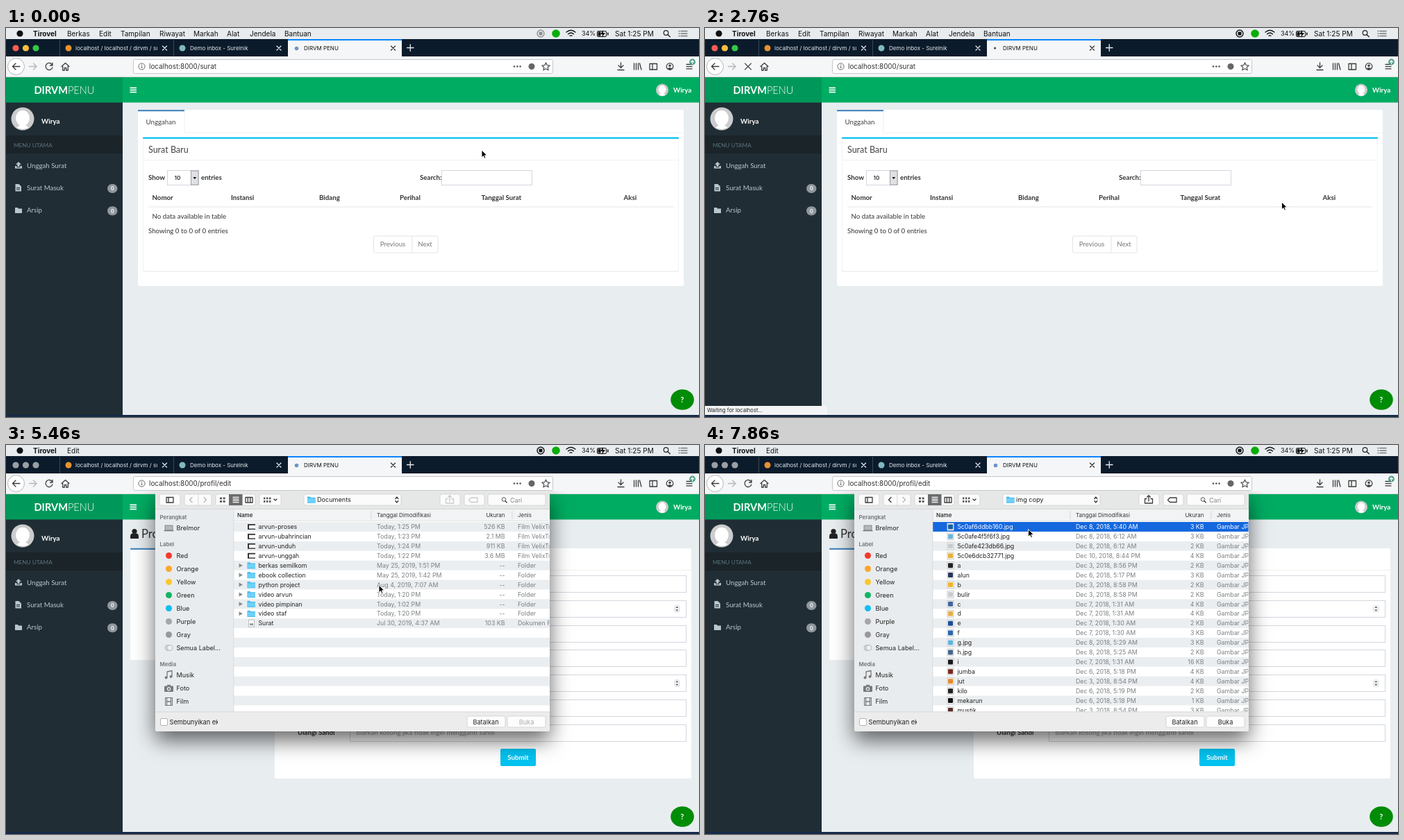
Recreate the animation shown at these times as an HTML page. Size 998 px wide and 561 px high, loop 8000 ms.

```html
<!DOCTYPE html>
<html lang="id">
<head>
<meta charset="utf-8">
<title>Unggahan</title>
<style>
html, body { margin: 0; width: 100%; height: 100%; overflow: hidden; background: #e9edf0; }
svg { display: block; width: 998px; height: 561px; }
text { white-space: pre; }
.mac { font-family: Inter, Roboto, sans-serif; }
.web { font-family: Lato, "Open Sans", sans-serif; }
.b { font-weight: 700; }
.m { font-weight: 600; }
.l { font-weight: 300; }
.line { fill: none; stroke: #3c3c3c; stroke-width: 1.3; stroke-linecap: round; stroke-linejoin: round; }
</style>
</head>
<body>
<svg id="stage" viewBox="0 0 998 561" xmlns="http://www.w3.org/2000/svg"></svg>
<script>
const LOOP = 8000;

// Drawing helpers
const R = (x, y, w, h, fill, more = '') => `<rect x="${x}" y="${y}" width="${w}" height="${h}" fill="${fill}" ${more}/>`;
const C = (x, y, r, fill, more = '') => `<circle cx="${x}" cy="${y}" r="${r}" fill="${fill}" ${more}/>`;
const P = (d, more = '') => `<path d="${d}" class="line" ${more}/>`;
const F = (d, fill, more = '') => `<path d="${d}" fill="${fill}" ${more}/>`;
const G = (id, body, more = '') => `<g id="${id}" ${more}>${body}</g>`;
const esc = s => s.replace(/&/g, '&amp;').replace(/</g, '&lt;');
// y is the middle of the capitals
const T = (x, y, s, size, fill = '#222', more = '') =>
  `<text x="${x}" y="${(y + size * .36).toFixed(2)}" font-size="${size}" fill="${fill}" ${more}>${esc(s)}</text>`;
const MID = 'text-anchor="middle" ', END = 'text-anchor="end" ', BOLD = 'class="b" ';
const ink = c => `style="stroke:${c}"`;
const box = (x, y, w, h, stroke = '#d2d6de', r = 0, fill = '#fff') =>
  R(x + .5, y + .5, w - 1, h - 1, fill, `stroke="${stroke}" rx="${r}"`);
const cross = (x, y, r, c) => P(`M${x - r} ${y - r}l${2 * r} ${2 * r}m0 ${-2 * r}l${-2 * r} ${2 * r}`, ink(c));

function avatar(x, y, r) {
  return C(x, y, r, '#cbcccd') +
    `<ellipse cx="${x}" cy="${y - r * .06}" rx="${r * .6}" ry="${r * .68}" fill="#fff"/>` +
    F(`M${x - r * .52} ${y + r * .74}Q${x} ${y + r * .3} ${x + r * .52} ${y + r * .74}Q${x} ${y + r * 1.08} ${x - r * .52} ${y + r * .74}Z`, '#fff');
}
const folder = (x, y) => F(`M${x - 6} ${y - 4.5}h4l1 1.2h6.5v8h-11.5z`, '#4fbdf0') + R(x - 6, y - 2, 11.5, 5.8, '#6fd0f8');

function menuBar() {
  const items = [[134, 'Edit'], [165, 'Tampilan'], [221, 'Riwayat'], [270, 'Markah'], [318, 'Alat'], [351, 'Jendela'], [401, 'Bantuan']];
  return R(0, 0, 998, 16, '#e8ecef') + C(20, 8, 4.6, '#111') +
    T(39, 8, 'Tirovel', 10, '#111', BOLD) +
    G('fullMenu', T(88, 8, 'Berkas', 10, '#111') + items.map(([x, s]) => T(x, 8, s, 10, '#111')).join('')) +
    G('shortMenu', T(88, 8, 'Edit', 10, '#111')) +
    G('rec', C(770, 8, 5, 'none', 'stroke="currentColor" stroke-width="1.4"') + R(767.5, 5.5, 5, 5, 'currentColor', 'rx="1"')) +
    C(792, 8, 5.8, '#0aad0a') +
    P('M807 6Q813.5 .5 820 6M809.5 8.7Q813.5 5.2 817.5 8.7M812 11.2Q813.5 10 815 11.2', 'stroke-width="1.6" ' + ink('#111')) +
    T(829, 8, '34%', 9, '#111') + box(851, 4, 14, 9, '#111', 1.5, 'none') + R(866, 6.5, 1.5, 4, '#111') + R(852.5, 5.5, 4, 6, '#111') +
    F('M860 3l-4 6h3l-1 5 5-7h-3z', '#111') +
    T(877, 8, 'Sat 1:25 PM', 10.1, '#111') +
    C(950.5, 7, 3.3, 'none', 'stroke="#222" stroke-width="1.2"') + P('M953 9.5l3.3 3.3', ink('#222')) +
    P('M969 4.5h1m2 0h9M969 8h1m2 0h9M969 11.5h1m2 0h9', ink('#777'));
}

function browser() {
  const lights = (a, b, c) => C(14, 29, 4.6, a) + C(28.5, 29, 4.6, b) + C(43, 29, 4.6, c);
  const white = '#e6eaee';
  return R(0, 16, 998, 25, '#0b1b2b') +
    G('lightsOn', lights('#fb5b52', '#fdbd3e', '#33c748')) + G('lightsOff', lights('#9a9fa4', '#9a9fa4', '#9a9fa4')) +
    R(77, 17, 1, 24, '#394654') + R(241, 17, 1, 24, '#394654') +
    C(90, 29, 4.5, '#e8912f') +
    `<clipPath id="tabClip"><rect x="97" y="18" width="121" height="22"/></clipPath>` +
    `<g clip-path="url(#tabClip)">${T(100, 29, 'localhost / localhost / dirvm / surat', 8, white)}</g>` +
    cross(228.5, 29, 3, white) + C(254, 29, 4.5, '#7fb9bd') + T(265, 29, 'Demo inbox - Surelnik', 8, white) + cross(393, 29, 3, white) +
    R(406, 16, 164, 25, '#f5f6f7') + R(406, 16, 164, 2, '#0a84ff') +
    G('favicon', C(418.5, 29.5, 2.8, '#6b95c6')) + C(0, 29, 1.6, '#444', 'id="dot"') +
    T(429, 29, 'DIRVM PENU', 8, '#111') + cross(557.5, 29, 3, '#333') +
    P('M577.5 28.5h9.5m-4.75 -4.75v9.5', ink(white)) +
    R(0, 41, 998, 30, '#f5f6f7') + R(0, 70, 998, 1, '#d5d8da') +
    C(14.5, 55.5, 12, '#fff', 'stroke="#b3b5b7"') + P('M20 55.5h-10.5m4.5 -4.5l-4.5 4.5 4.5 4.5', 'stroke-width="1.7"') +
    P('M33.5 55.5h10.5m-4.5 -4.5l4.5 4.5 -4.5 4.5', ink('#b5b7b9')) +
    G('reload', P('M66.5 53a5 5 0 1 0 .4 4M67 50.5v3.5h-3.5', 'stroke-width="1.6"')) +
    G('stop', cross(62, 55.5, 4.4, '#3c3c3c')) +
    P('M80 55.5l5.5 -5 5.5 5M81.7 55.5v5.5h2.6v-3.5h2.4v3.5h2.6v-5.5') +
    box(183, 45, 605, 21, '#c6c8ca', 2) +
    C(195.5, 55.5, 4.6, 'none', 'stroke="#666"') + R(195, 54.8, 1.2, 3.2, '#666') + R(195, 52.7, 1.2, 1.2, '#666') +
    `<text id="url" x="206" y="59.3" font-size="9.9" fill="#333"></text>` +
    C(732, 55.5, 1.3, '#555') + C(736.3, 55.5, 1.3, '#555') + C(740.6, 55.5, 1.3, '#555') +
    C(757, 55.5, 4.5, '#666') +
    P('M777.5 50l1.7 3.7 4 .4 -3 2.7 .9 4 -3.6 -2.1 -3.6 2.1 .9 -4 -3 -2.7 4 -.4z', ink('#555')) +
    P('M885.5 50v7m-3.5 -3l3.5 3.5 3.5 -3.5M881 60.5h9') +
    P('M904.5 51v9m3 -9v9m3 -9v9m2 -9l2.5 9') +
    P('M927 51.5h10.5v8.5h-10.5zM931 51.5v8.5') +
    C(956, 55.5, 4.8, 'none', 'stroke="#444" stroke-width="1.3"') + C(956, 54.2, 1.8, '#444') + F('M952.5 58.5q3.5 -3 7 0l-3.5 2z', '#444') +
    P('M980 52.5h8m-8 3.2h8m-8 3.2h8') + C(988.5, 49, 4.4, '#4a9b84') + P('M988.5 51.5v-4.5m-2 2l2 -2 2 2', ink('#fff'));
}

function frame() {
  const side = '#b8c7ce';
  const badge = y => R(146, y - 6.5, 14.5, 13, '#8f979c', 'rx="6.5"') + T(153.2, y, '0', 8, '#fff', MID + BOLD);
  return R(0, 71, 998, 490, '#e8edf0') + R(0, 71, 168, 37, '#00985a') + R(168, 71, 830, 36.5, '#00ac62') +
    `<text x="84" y="94.8" font-size="14.6" fill="#fff" text-anchor="middle"><tspan class="b">DIRVM</tspan><tspan class="l">PENU</tspan></text>` +
    [85.5, 88.6, 91.7].map(y => R(178.5, y, 9.5, 1.7, '#fff')).join('') +
    avatar(945, 89.5, 9) + T(961, 89.5, 'Wirya', 9.7, '#fff', BOLD) +
    R(0, 107.5, 168, 451, '#202d34') + avatar(24, 131, 16.5) + T(51, 134, 'Wirya', 9.8, '#fff', BOLD) +
    R(0, 155, 168, 26, '#1a2429') + T(11, 169, 'MENU UTAMA', 8.2, '#5b737e') +
    F('M18 193l4 4h-2.5v3h-3v-3h-2.5zM13 199h2.5v2h5v-2h2.5v3.5h-10z', side) + T(30, 198.5, 'Unggah Surat', 9.7, side) +
    F('M13.5 225h5l3.5 3.5v7h-8.5z', side) + R(15, 230, 5, 1, '#202d34') + R(15, 232.3, 5, 1, '#202d34') +
    T(30, 230.5, 'Surat Masuk', 9.7, side) + badge(231.5) +
    F('M13 259h4l1 1.5h5v6.5h-10z', side) + T(30, 263, 'Arsip', 9.7, side) + badge(263.7);
}

function inbox() {
  const dark = '#333';
  const heads = [[210.5, 'Nomor'], [324, 'Instansi'], [451, 'Bidang'], [567, 'Perihal'], [684.5, 'Tanggal Surat'], [889.5, 'Aksi']];
  return R(190, 118, 786, 254, '#fff', 'rx="2.5"') + R(257, 150.5, 719, 1, '#f0f1f2') +
    R(190, 118, 67, 2.2, '#4a89c0') + R(256.5, 120, 1, 31, '#eef0f2') + T(201.5, 136, 'Unggahan', 9.7, '#444') +
    R(197, 158, 772, 193.5, '#e4e6e8', 'rx="2"') + R(197.5, 158, 771, 192.5, '#fff', 'rx="2"') + R(197, 157.5, 772, 2.2, '#00c0ef', 'rx="1"') +
    T(205, 175, 'Surat Baru', 12.5, '#444') + R(198, 190, 770, 1, '#f1f2f3') +
    T(205, 215.5, 'Show', 9.7, dark, BOLD) + box(232, 205, 46, 22) +
    T(247, 216, '10', 8.2, dark, MID + 'class="mac m"') + R(266.5, 206, 10.5, 20, '#dfe1e3', 'stroke="#8f9193" stroke-width=".8"') +
    F('M269.3 215h5l-2.5 3z', '#111') + T(281, 215.5, 'entries', 9.7, dark, BOLD) +
    T(627.5, 215.5, 'Search:', 9.7, dark, END + BOLD) + box(627, 205, 131, 22) +
    heads.map(([x, s]) => T(x, 244.5, s, 9.7, dark, BOLD)).join('') +
    R(205, 257.3, 756, 1.3, '#ececec') + T(210.5, 272, 'No data available in table', 9.7, dark) +
    T(205, 292.5, 'Showing 0 to 0 of 0 entries', 9.7, dark) +
    box(529, 299.5, 93.5, 25, '#e2e4e6', 2) + R(584.5, 300, 1, 24, '#e2e4e6') +
    T(557, 312, 'Previous', 9.7, '#777', MID) + T(603.5, 312, 'Next', 9.7, '#777', MID);
}

function profile() {
  const hint = 'biarkan kosong jika tidak ingin mengganti sandi';
  const rows = [['Foto', ''], ['Nomor Induk', '1234009900110022'], ['Nama', 'Wirya'], ['Surel', 'wirya@mail.test'],
    ['Nomor Telepon', '80055500123'], ['Ubah Sandi', hint], ['Ulangi Sandi', hint]];
  const spin = y => R(962.5, y - 5, 7.5, 10, '#f3f4f5', 'rx="3.5" stroke="#d0d2d4" stroke-width=".7"') +
    F(`M964.3 ${y - 1.2}h4l-2 -2.4zM964.3 ${y + 1.2}h4l-2 2.4z`, '#555');
  const field = ([label, value], i) => {
    const y = 200.5 + i * 35.75;
    return T(473.5, y, label, 9.7, '#333', END + BOLD) + box(495, Math.round(y - 12.5), 485, 25) +
      T(504.5, y, value, 9.7, i > 4 ? '#999' : '#555') + (i == 1 || i == 4 ? spin(y) : '');
  };
  return C(185, 124.5, 3.6, '#222') + F('M179 135v-3q0 -4.5 3.5 -4.5h5q3.5 0 3.5 4.5v3z', '#222') + T(195, 128.5, 'Profile', 16.6, '#333') +
    R(179, 149, 185.5, 161, '#fff', 'rx="2.5"') + R(179, 148.7, 185.5, 2.2, '#4a89c0', 'rx="1"') +
    C(271.8, 194, 35.5, '#fff', 'stroke="#d0d4da" stroke-width="1.8"') + avatar(271.8, 194, 32.5) +
    T(271.8, 243, 'Wirya', 14.6, '#333', MID) + T(271.8, 267, 'wirya@mail.test', 9.7, '#777', MID + BOLD) + T(271.8, 288.5, 'Pusat PENU', 9.7, '#777', MID) +
    R(387, 149, 600, 332, '#fff', 'rx="2.5"') + R(489, 180, 498, 1, '#f0f1f2') + R(489, 151, 1, 30, '#eef0f2') +
    R(387, 148.7, 102.5, 2.2, '#4a89c0') + T(398, 166, 'Pengaturan Profile', 9.7, '#444') +
    rows.map(field).join('') +
    R(504.5, 193, 64.5, 19, '#e3e4e5') + P('M504.5 212v-19h64.5v19', 'stroke-width=".8" ' + ink('#8d8f91')) +
    T(536.7, 205, 'Browse...', 9.7, '#222', MID + 'class="mac"') + T(573, 205.5, 'No file selected.', 9.7, '#555') +
    R(712, 438, 51, 25, '#00b8e6', 'rx="2"') + R(712.7, 438.7, 49.6, 23.6, '#00c3f0', 'rx="1.5"') + T(737.5, 450.5, 'Submit', 9.7, '#fff', MID + BOLD);
}

// name|date|size
const DOCS = `arvun-proses|Today, 1:25 PM|526 KB
arvun-ubahrincian|Today, 1:23 PM|2.1 MB
arvun-unduh|Today, 1:24 PM|911 KB
arvun-unggah|Today, 1:22 PM|3.6 MB
berkas semilkom|May 25, 2019, 1:51 PM|--
ebook collection|May 25, 2019, 1:42 PM|--
python project|Aug 4, 2019, 7:07 AM|--
video arvun|Today, 1:20 PM|--
video pimpinan|Today, 1:02 PM|--
video staf|Today, 1:20 PM|--
Surat|Jul 30, 2019, 4:37 AM|103 KB`.split('\n');
// name|day and time in December|KB
const IMAGES = `5c0af6ddbb160.jpg|8, 5:40 AM|3
5c0afe4f5f6f3.jpg|8, 6:12 AM|3
5c0afe423db66.jpg|8, 6:12 AM|2
5c0e6dcb32771.jpg|10, 8:44 PM|4
a|3, 8:56 PM|2
alun|6, 5:17 PM|3
b|3, 8:58 PM|2
bulir|3, 8:58 PM|2
c|7, 1:31 AM|4
d|7, 1:31 AM|4
e|7, 1:30 AM|2
f|7, 1:30 AM|3
g.jpg|8, 5:29 AM|3
h.jpg|8, 5:25 AM|2
i|7, 1:31 AM|16
jumba|6, 5:18 PM|4
jut|3, 8:54 PM|4
kilo|6, 5:19 PM|2
mekarun|6, 5:18 PM|1
mustik|3, 8:54 PM|3`.split('\n');
const THUMBS = '#1a5fa8 #6fb5d8 #c9cdd0 #e9b23c #222 #24385c #f0b429 #c9cdd0 #41659c #e3b04b #1f4e96 #2767ab #5fb4dc #46648c #181818 #7a2a22 #e58a2c #222 #111 #5a2f2a'.split(' ');

const BLUE = '#1567de';
const rowY = i => 118 + i * 13.92;
function fileRow(i, name, date, size, kind, icon, on) {
  const y = rowY(i), c = on ? '#fff' : '#222', g = on ? '#fff' : '#7c7f82';
  return (on ? R(328, y - 7, 455, 13.9, BLUE) : '') + icon(353.5, y) + T(363.5, y, name, 8.75, c) + T(534, y, date, 8.8, g) +
    T(718.5, y, size, 8.8, g, END) + T(737, y, kind, 8.8, g);
}
const film = (x, y) => R(x - 5.5, y - 4, 11, 8, '#333') + R(x - 3.5, y - 2.2, 9, 4.8, '#f6f6f6');
const sheet = (x, y) => box(x - 4.5, y - 5.5, 9, 11, '#bbb') + R(x - 2.5, y, 5, 3, '#999');
const docFolder = (x, y) => F(`M${x - 18} ${y - 3}l5.5 3 -5.5 3z`, '#8a8d90') + folder(x, y);
function docRow(line, i) {
  const [kind, icon] = i < 4 ? ['Film VelixTrak', film] : i < 10 ? ['Folder', docFolder] : ['Dokumen Rich', sheet];
  return fileRow(i, ...line.split('|'), kind, icon);
}
function imageRow(line, i, on) {
  const [name, date, size] = line.split('|');
  const [day, time] = date.split(', ');
  const icon = (x, y) => box(x - 5, y - 5.5, 10, 11, '#c8cacc') + R(x - 3.5, y - 3.5, 7, 7, THUMBS[i], 'rx="1"');
  return fileRow(i, name, `Dec ${day}, 2018, ${time}`, size + ' KB', 'Gambar JPEG', icon, on);
}

function dialog() {
  const gray = '#555';
  const btn = (x, w) => R(x, 71, w, 16, '#fbfbfb', 'rx="2.5" stroke="#d0d0d0" stroke-width=".8"');
  const tags = [['Red', '#f5392f'], ['Orange', '#f9a72d'], ['Yellow', '#fbc62e'], ['Green', '#13b564'], ['Blue', '#12bdf0'], ['Purple', '#a6a6a9'], ['Gray', '#98989c']];
  const head = (y, s) => T(221.5, y, s, 7.9, '#6f7275', 'class="m"');
  const item = (y, s) => T(245.5, y, s, 9.1, '#222');
  const tiles = (x, n, w) => {
    let s = '';
    for (let i = 0; i < n * 2; i++) s += R(x + (i >> 1) * (w + 1.6), 75.5 + i % 2 * 4.5, w, 2.8, gray);
    return s;
  };
  let stripes = '';
  for (let i = 0; i < 20; i += 2) stripes += R(328, rowY(i) - 7, 455, 13.9, '#ebeef0');
  const share = P('M636 77.5h-2.5v6.5h11v-6.5h-2.5M639 81v-8m-2.3 2l2.3 -2.3 2.3 2.3', 'stroke-width="1"');
  const tag = P('M669.5 76h9.5v6.5h-9.5l-3 -3.25z', 'stroke-width="1"');
  return R(215, 66, 568, 347, '#ececec', 'rx="2"') + R(215, 66, 568, 27, '#e6e7e7') + R(215, 92.5, 568, .8, '#c8c8c8') +
    btn(221, 30) + P('M231 75.5h10v7.5h-10zM234 75.5v7.5', 'stroke-width="1"') +
    btn(257, 39) + R(276.5, 71, .8, 16, '#d0d0d0') + P('M268 75.5l-3.5 3.5 3.5 3.5', 'id="back"') + P('M285 75.5l3.5 3.5 -3.5 3.5', ink('#b5b5b5')) +
    btn(302, 57) + R(321, 71, 19.5, 16, '#6a6b6c') + tiles(308, 2, 3) + P('M327 75.4h8m-8 2.4h8m-8 2.4h8m-8 2.4h8', 'stroke-width="1" ' + ink('#fff')) +
    P('M345 75.5h10v7.5h-10zM348.3 75.5v7.5M351.7 75.5v7.5', 'stroke-width="1"') +
    btn(365, 31) + tiles(371, 3, 2.4) + P('M386 78l2 2 2 -2', 'stroke-width="1"') +
    btn(429, 140) + folder(440, 79) + T(448, 79, 'Documents', 9.1, '#222', 'id="here"') +
    P('M560.8 77.5l2 -2.5 2 2.5M560.8 80.5l2 2.5 2 -2.5', 'stroke-width="1.1"') +
    btn(625, 29) + btn(660, 29) + G('tools', share + tag) +
    btn(694, 83) + C(717, 78.5, 2.8, 'none', 'stroke="#555"') + P('M719 80.7l2.3 2.3', 'stroke-width="1"') + T(726, 79.5, 'Cari', 9, '#888') +
    R(215, 93, 113, 292, '#e9ecee') + R(328, 93, 455, 292, '#fff') + stripes +
    head(104, 'Perangkat') + R(229, 116, 11, 7, '#b4b7ba', 'stroke="#777" stroke-width=".8"') + R(227.5, 123, 14, 1.3, '#777') + item(120, 'Brelmor') +
    head(143.5, 'Label') + tags.map(([s, c], i) => C(234.5, 159.5 + i * 19, 4.5, c) + item(159.5 + i * 19, s)).join('') +
    C(233, 292.5, 4, '#d7dadc', 'stroke="#aaa" stroke-width=".8"') + C(236, 292.5, 4, '#eceef0', 'stroke="#aaa" stroke-width=".8"') + item(292.5, 'Semua Label...') +
    head(316, 'Media') + item(332, 'Musik') + item(351, 'Foto') + item(370, 'Film') +
    P('M232 335v-8l7 -1.5v8', ink('#777')) + C(230.5, 335.5, 1.9, '#777') + C(237.5, 334, 1.9, '#777') +
    R(228, 347.5, 13, 8.5, '#77797c', 'rx="1"') + R(232, 345.8, 5, 2, '#77797c') + C(234.5, 351.7, 2.7, '#e9ecee') + C(234.5, 351.7, 1.5, '#77797c') +
    box(229, 364, 11, 12, '#77797c', 0, '#e9ecee') + P('M231.5 364.5v11M237.5 364.5v11M231.5 370h6', 'stroke-width=".9" ' + ink('#77797c')) +
    `<clipPath id="listClip"><rect x="328" y="93" width="454.5" height="291.5"/></clipPath><g clip-path="url(#listClip)">` +
    R(328, 93, 455, 16.5, '#f2f3f4') + R(328, 109, 455, .8, '#dedede') + R(525.5, 95, .8, 12, '#d2d2d2') + R(728.5, 95, .8, 12, '#d2d2d2') +
    T(333, 101, 'Name', 7.9, '#333', 'class="m"') + T(534, 101, 'Tanggal Dimodifikasi', 7.95, '#333') + T(718.5, 101, 'Ukuran', 7.95, '#333', END) + T(737, 101, 'Jenis', 7.95, '#333') +
    G('docs', DOCS.map(docRow).join('')) + G('images', IMAGES.map((s, i) => imageRow(s, i)).join('')) + G('picked', imageRow(IMAGES[0], 0, true)) +
    `</g>` + R(215, 384.5, 568, .8, '#cfcfcf') + R(327.5, 93, .8, 292, '#d3d6d8') +
    box(222, 394, 11, 11, '#b4b4b4', 1.5) +
    `<clipPath id="hideClip"><rect x="234" y="390" width="71" height="20"/></clipPath><g clip-path="url(#hideClip)">${T(235.5, 399.5, 'Sembunyikan ekstensi', 9.2, '#222')}</g>` +
    [664, 722].map(x => R(x, 391, 55, 16, '#fdfdfd', 'rx="2.5" stroke="#cfcfcf" stroke-width=".8"')).join('') +
    T(691, 399.5, 'Batalkan', 9.2, '#222', MID) + T(749.5, 399.5, 'Buka', 9.2, '#222', MID + 'id="open"');
}

const PLACES = [[79.5, 'Documents'], [94.5, 'arvun'], [109, 'Users'], [124, 'Verdunost HD'], [138.5, 'Brelmor'],
  [175, 'Documents'], [189.5, 'img copy'], [204, 'Desktop'], [218.5, 'dummy surat'], [233, 'layouts']];
function popup() {
  const house = (x, y) => F(`M${x - 5} ${y}l5 -4.5 5 4.5h-1.5v4.5h-7v-4.5z`, '#9a7a62') + R(x - 1, y + 1, 2.3, 3.5, '#fff');
  const drive = (x, y) => F(`M${x - 4} ${y - 4}h8l1.5 5v3.5h-11v-3.5z`, '#8c8f92') + R(x - 4, y + 2, 8, 1, '#ddd');
  const screen = (x, y) => R(x - 5.5, y - 4, 11, 7, '#3f6fa8', 'stroke="#555" stroke-width=".8"') + R(x - 6, y + 3.5, 12, 1, '#666');
  const icons = { 1: house, 3: drive, 4: screen };
  return R(418, 70, 141, 174.5, '#f1f2f2', 'rx="3.5" stroke="#c4c6c8" stroke-width=".7" style="filter:drop-shadow(0 4px 6px rgba(0,0,0,.35))"') +
    R(418.3, 0, 140.4, 14.7, BLUE, 'id="hover"') +
    P('M422.5 79.5l2 2.7 3.5 -5.7', 'id="tick"') + T(426, 161, 'Tempat Terbaru', 7.9, '#9a9c9e', 'class="m"') +
    PLACES.map(([y, s], i) => (icons[i] || folder)(440, y) + T(448, y, s, 9.2, '#222', 'class="place"')).join('') +
    T(553.5, 94.5, '⇧⌘H', 9.2, '#222', END);
}

document.getElementById('stage').innerHTML =
  `<g class="mac">${browser()}</g><g class="web">${frame()}${G('inbox', inbox())}${G('profile', profile())}` +
  `<ellipse cx="974" cy="536" rx="16.8" ry="14.8" fill="#008c06"/>${T(973.7, 536, '?', 11, '#fff', MID + BOLD)}</g>` +
  R(0, 558, 998, 3, '#152a48') +
  `<g class="mac">${G('status', R(0, 545, 176, 13, '#f3f4f5') + '<text id="note" x="3" y="554.3" font-size="7.6" fill="#222"></text>')}` +
  `<clipPath id="below"><rect x="0" y="66" width="998" height="495"/></clipPath>` +
  `<g clip-path="url(#below)">${G('dialog', dialog(), 'style="filter:drop-shadow(0 13px 15px rgba(0,0,0,.6))"')}</g>` +
  `${G('popup', popup())}${menuBar()}</g>` +
  G('cursor', F('M0 0V10.8L2.5 8.5 4.1 12.1 5.9 11.3 4.3 7.8H7.7Z', '#000', 'stroke="#fff" stroke-width=".9" stroke-linejoin="round"'));

const $ = id => document.getElementById(id);
const show = (id, on) => $(id).style.display = on ? '' : 'none';
const ease = p => p * p * (3 - 2 * p);
const part = (t, a, b) => ease(Math.min(1, Math.max(0, (t - a) / (b - a))));
const places = [...document.querySelectorAll('.place')];

// Pointer moves: start, end, x, y
const MOVES = [[60, 800, 961, 90], [900, 1560, 830.5, 251], [4260, 4860, 537, 202], [5760, 6240, 497, 78], [6540, 6820, 509.5, 188], [7480, 7820, 465.5, 121.5]];
function pointer(t) {
  let x = 685, y = 176;
  for (const [a, b, nx, ny] of MOVES) {
    const p = part(t, a, b);
    x += (nx - x) * p;
    y += (ny - y) * p;
  }
  return [x, y];
}

function draw(t) {
  const [x, y] = pointer(t);
  $('cursor').setAttribute('transform', `translate(${x.toFixed(2)} ${y.toFixed(2)})`);
  const loading = t >= 1620 && t < 4080, moved = t >= 3480, sheetOn = t >= 5100;
  $('rec').style.color = t < 240 ? '#8d9093' : '#111';
  show('stop', loading);
  show('reload', !loading);
  show('dot', loading);
  show('favicon', !loading);
  show('status', loading);
  $('dot').setAttribute('cx', 418.5 - 4 * Math.cos((t - 1800) / 792 * 2 * Math.PI));
  $('note').textContent = moved ? 'Transferring data from localhost...' : 'Waiting for localhost...';
  $('url').textContent = 'localhost:8000/' + (moved ? 'profil/edit' : 'surat');
  show('inbox', t < 4020);
  show('profile', t >= 4020);

  show('fullMenu', !sheetOn);
  show('shortMenu', sheetOn);
  show('lightsOn', !sheetOn);
  show('lightsOff', sheetOn);
  show('dialog', sheetOn);
  $('dialog').setAttribute('transform', `translate(0 ${(-347 * (1 - part(t, 5060, 5360))).toFixed(2)})`);

  const inside = t >= 7200, picked = t >= 7840;
  show('docs', !inside);
  show('images', inside);
  show('picked', picked);
  $('here').textContent = inside ? 'img copy' : 'Documents';
  $('back').style.stroke = inside ? '#333' : '#b5b5b5';
  $('tools').style.opacity = picked ? 1 : .25;
  $('open').style.fill = picked ? '#222' : '#aaa';

  show('popup', t >= 6360 && t < 7080);
  const over = PLACES.findIndex(p => Math.abs(p[0] - y) <= 7.3);
  show('hover', over >= 0);
  if (over >= 0) $('hover').setAttribute('y', PLACES[over][0] - 7.3);
  places.forEach((el, i) => el.style.fill = i == over ? '#fff' : '#222');
  $('tick').style.stroke = over == 0 ? '#fff' : '#222';
}

const start = performance.now();
function tick() {
  draw((performance.now() - start) % LOOP);
  requestAnimationFrame(tick);
}
tick();
</script>
</body>
</html>
```
